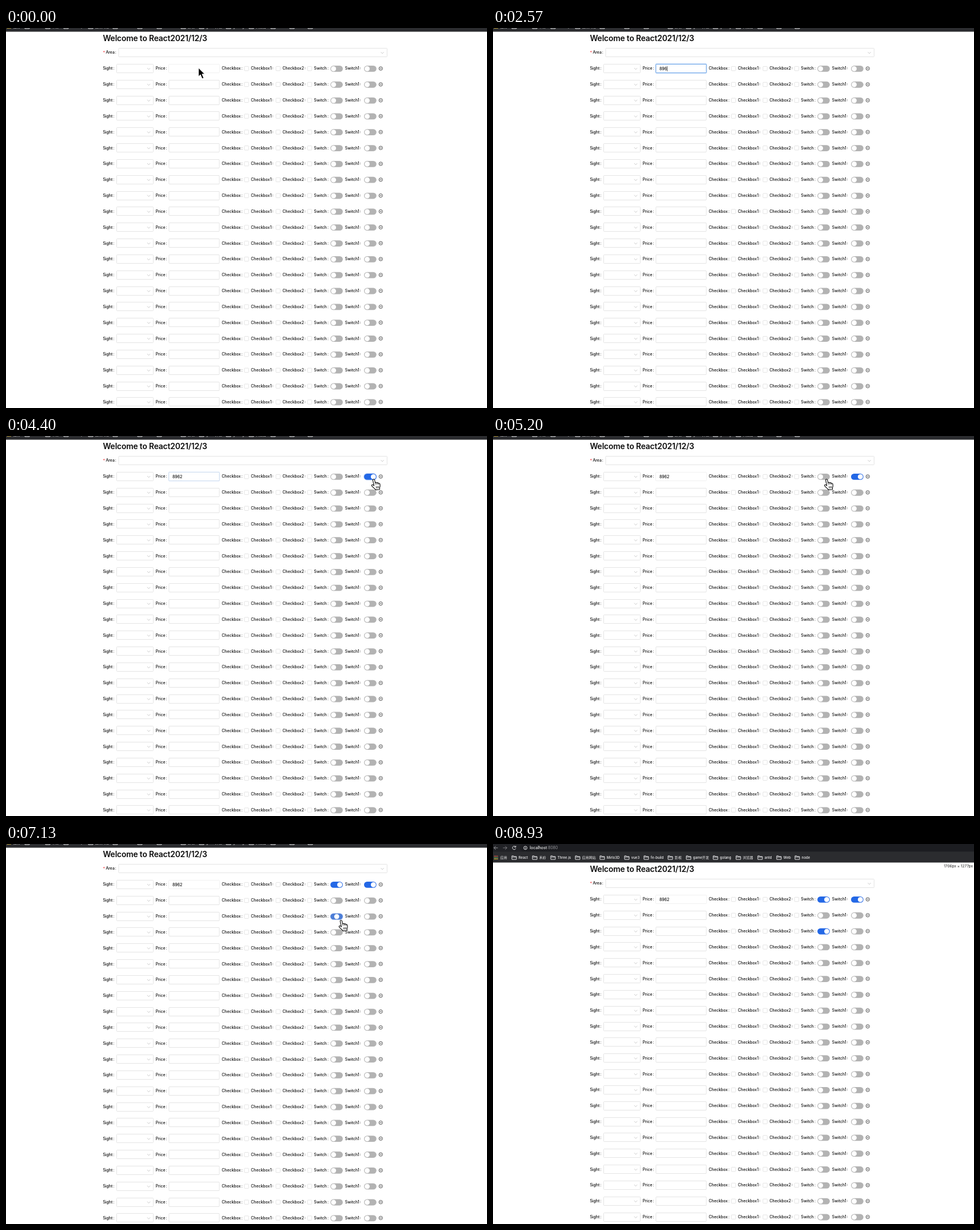
An HTML page for the animation above (9630 ms loop, 841 px wide and 666 px high).

```html
<!DOCTYPE html>
<html lang="en">
<head>
<meta charset="utf-8">
<title>Form list</title>
<style>
  html, body { margin: 0; width: 100%; height: 100%; overflow: hidden; background: #fff; }
  svg { display: block; width: 841px; height: 666px; }
  text { font: 500 6.9px Inter, "Noto Sans CJK SC", "Noto Sans CJK", sans-serif; fill: #0c0c0c; white-space: pre; }
  .title { font-size: 13.8px; font-weight: 600; letter-spacing: -.15px; }
  .mark { font-size: 6px; fill: #f1f1f2; }
  .box { fill: #fff; stroke: #dedede; stroke-width: .8; }
  .line { fill: none; stroke: #b8b8b8; stroke-width: .7; }
  .tool { fill: none; stroke: #e4e4e6; stroke-width: 1; }
  .icon { fill: none; stroke: #2a2a2a; stroke-width: .8; }
</style>
</head>
<body>
<svg id="stage" viewBox="0 0 841 666"></svg>
<script>
const LOOP = 9630, ROWS = 22, TOP = 97, PITCH = 27.83, SCROLL = -26;
const SWITCH_X = [567.2, 626], TEXT_X = 291;
const GRAY = [179, 179, 179], BLUE = [36, 104, 230];

const stage = document.getElementById('stage');
function add(parent, tag, attrs = {}, text) {
  const el = document.createElementNS('http://www.w3.org/2000/svg', tag);
  set(el, attrs);
  if (text !== undefined) el.textContent = text;
  return parent.appendChild(el);
}
function set(el, attrs) {
  for (const key in attrs) el.setAttribute(key, attrs[key]);
}
const rowY = i => TOP + i * PITCH;
const clamp = v => Math.max(0, Math.min(1, v));
const smooth = v => { v = clamp(v); return v * v * (3 - 2 * v); };
const mix = (a, b, p) => `rgb(${a.map((v, i) => Math.round(v + (b[i] - v) * p))})`;
const show = (el, on) => el.setAttribute('visibility', on ? 'visible' : 'hidden');

const page = add(stage, 'g');
const label = (x, y, text) => {
  const el = add(page, 'text', { x, y: y + 2.4 }, text);
  add(el, 'tspan', { dx: 1 }, ':');
};
const box = (x, y, w) => add(page, 'rect', {
  class: 'box', x, y: Math.round(y - 8) + .5, width: w, height: 15, rx: .9
});
const chevron = (x, y) =>
  add(page, 'path', { class: 'line', d: `M${x - 2.6} ${y - 1.2}l2.6 2.9l2.6 -2.9` });

function drawBrowser() {
  add(page, 'rect', { width: 841, height: 32.5, fill: '#2b2c2f' });
  add(page, 'rect', { width: 841, height: 13.5, fill: '#212226' });
  add(page, 'rect', { x: 47, y: -1, width: 810, height: 14, rx: 7, fill: '#1c1d21' });
  add(page, 'path', { class: 'tool', opacity: .6, d: 'M8.5 6.8H1.8M4.8 3.7L1.7 6.8L4.8 9.9' });
  add(page, 'path', { class: 'tool', opacity: .45, d: 'M17.5 6.8H24.2M21.2 3.7L24.3 6.8L21.2 9.9' });
  add(page, 'path', { class: 'tool', d: 'M39.3 4.8A3 3 0 1 0 39.9 7.6M39.9 3.2V5.5H37.4' });
  add(page, 'circle', { class: 'tool', cx: 56.6, cy: 6.8, r: 2.9, 'stroke-width': .7 });
  add(page, 'path', { class: 'tool', d: 'M56.6 6.3V8.5M56.6 4.9V5.6' });
  const url = add(page, 'text', { x: 64.3, y: 9.2, style: 'fill:#f2f2f2' }, 'localhost');
  add(url, 'tspan', { style: 'fill:#96979b;font-weight:400' }, ':8080');

  const dots = ['#e05a4e', '#58a55c', '#e8c33a'];
  for (let i = 0; i < 9; i++) {
    add(page, 'rect', {
      x: 2 + (i % 3) * 2.4, y: 20.6 + Math.floor(i / 3) * 2.4,
      width: 1.6, height: 1.6, fill: dots[Math.floor(i / 3)]
    });
  }
  add(page, 'text', { class: 'mark', x: 12.7, y: 26 }, '应用');
  const marks = [
    [33, 'React'], [69, '禾岭'], [101, 'Three.js'], [144, '应用网站'], [187, 'Mirlo3D'],
    [230, 'vue3'], [264, 'fe-build'], [306, '影视'], [338, 'game开发'], [385, 'golang'],
    [425, '浏览器'], [463, 'antd'], [496, 'Web'], [528, 'node']
  ];
  for (const [x, name] of marks) {
    add(page, 'path', {
      class: 'tool', 'stroke-width': .8,
      d: `M${x} 20.8h3l1 1.2h4v5h-8zM${x} 22.9h8`
    });
    add(page, 'text', { class: 'mark', x: x + 11.8, y: 26 }, name);
  }
}

function makeSwitch(x, y) {
  const ring = add(page, 'rect', {
    x: x - 1.2, y: y - 6.2, width: 24.1, height: 13.2, rx: 6.6, fill: '#2468e6', opacity: 0
  });
  const track = add(page, 'rect', { x, y: y - 5, width: 21.7, height: 10.8, rx: 5.4, fill: mix(GRAY, BLUE, 0) });
  const knob = add(page, 'circle', { cx: x + 5.5, cy: y + .4, r: 4.4, fill: '#fff' });
  return { x, ring, track, knob };
}

drawBrowser();
add(page, 'text', { class: 'title', x: 169.4, y: 48.7 }, 'Welcome to React2021/12/3');
add(page, 'text', { x: 169.4, y: 72, style: 'fill:#f03a3e' }, '*');
label(174.4, 69, 'Area');
box(197, 69, 469.3);
chevron(658, 69.2);

const switches = [];
for (let i = 0; i < ROWS; i++) {
  const y = rowY(i);
  label(169.4, y, 'Sight');
  box(193.5, y, 64);
  chevron(249.6, y + .2);
  label(261.7, y, 'Price');
  box(284.9, y, 88);
  [[377.2, 'Checkbox', 416.8], [428.2, 'Checkbox1', 472], [483.5, 'Checkbox2', 527.2]].forEach(([x, name, cx]) => {
    label(x, y, name);
    add(page, 'rect', { class: 'box', x: cx, y: y - 3.6, width: 7.4, height: 7.4, rx: .8 });
  });
  label(538.6, y, 'Switch');
  label(592.8, y, 'Switch1');
  switches.push(SWITCH_X.map(x => makeSwitch(x, y)));
  add(page, 'circle', { class: 'icon', cx: 655.2, cy: y, r: 3.1 });
  add(page, 'path', { class: 'icon', d: `M653.6 ${y}h3.2` });
}

const halo = add(page, 'rect', {
  x: 284.4, y: 88.9, width: 89, height: 16.2, rx: 1.6, fill: 'none', stroke: '#2f7de6', 'stroke-width': 1.6, opacity: 0
});
const focusBox = box(284.9, TOP, 88);
set(focusBox, { style: 'stroke:#5297e8' });
const price = add(page, 'text', { x: TEXT_X, y: TOP + 2.5 });
const caret = add(page, 'rect', { y: 93, width: .7, height: 9, fill: '#111' });
const sizeNote = add(stage, 'text', {
  x: 839, y: 41.3, 'text-anchor': 'end', style: 'font-size:6.5px;font-weight:400;fill:#222'
}, '1706px × 1277px');

const cursors = {
  arrow: add(stage, 'g'),
  beam: add(stage, 'g'),
  hand: add(stage, 'g')
};
add(cursors.arrow, 'path', {
  d: 'M0 0V15L3.4 11.8L6.3 18.8L9.1 17.6L6.2 10.8H10.8Z',
  fill: '#000', stroke: '#fff', 'stroke-width': .9
});
add(cursors.beam, 'path', {
  d: 'M-2.4 -6.5Q0 -6.5 0 -5Q0 -6.5 2.4 -6.5M0 -5V5M-2.4 6.5Q0 6.5 0 5Q0 6.5 2.4 6.5M-1.2 2H1.2',
  fill: 'none', stroke: '#222', 'stroke-width': .9
});
add(cursors.hand, 'path', {
  d: 'M-1.7 1.6C-1.9 -.4 1 -.7 1.5 1.3L2.6 6.2C3 5.1 5 5.2 5.4 6.6C5.9 5.7 7.8 5.9 8.2 7.4' +
     'C8.8 6.6 10.6 7 10.9 8.8C11.5 11.6 11 13.4 10.2 15.2L10.2 18L3.2 18.6C2.2 16.4 -1.4 14.2 -3.3 11.8' +
     'C-4.4 10.2 -2.8 8.8 -1.4 9.8L.4 11.4Z',
  fill: '#fff', stroke: '#000', 'stroke-width': 1.1, 'stroke-linejoin': 'round'
});
add(cursors.hand, 'path', {
  d: 'M2.6 6.2L3.2 9.2M5.4 6.6L5.9 9.4M8.2 7.4L8.6 9.6M4.3 12.4L4.7 16M6.4 12.2L6.7 15.8M8.5 12L8.6 15.6',
  fill: 'none', stroke: '#000', 'stroke-width': .8
});

// [time, x, y] of the pointer tip
const path = [
  [3300, 340, 76], [3430, 430, 104], [3530, 540, 119], [3630, 618, 100], [3730, 639.5, 75.8],
  [4030, 643, 75.8], [4670, 643, 75.8], [5200, 583.3, 75.8], [5840, 583.3, 75.8],
  [6300, 585, 139.5], [6560, 585, 139.5], [6680, 588, 140], [6870, 586, 133.8]
];
// [time, row, column, on]
const clicks = [
  [4200, 0, 1, 1], [5470, 0, 0, 1], [7030, 2, 0, 1], [7700, 2, 0, 0], [8300, 2, 0, 1]
];
const keys = [[770, ''], [1500, '8'], [2000, '89'], [2570, '896'], [2900, '8962']];
const scroll = [[0, SCROLL], [8870, -19], [8900, -8], [8930, 0]];
const latest = (list, t) => list.filter(item => item[0] <= t).pop();

function pointerAt(t) {
  const i = path.findIndex(p => p[0] > t);
  if (i < 0) return path[path.length - 1].slice(1);
  if (i === 0) return path[0].slice(1);
  const [t0, x0, y0] = path[i - 1], [t1, x1, y1] = path[i];
  const slow = t1 - t0 > 250;
  const p = slow ? smooth((t - t0) / (t1 - t0)) : (t - t0) / (t1 - t0);
  return [x0 + (x1 - x0) * p, y0 + (y1 - y0) * p];
}

function cursorKind(x, y) {
  if (x < 373 && y < 80) return 'beam';
  const row = Math.round((y - SCROLL - TOP) / PITCH);
  const near = Math.abs(y - SCROLL - rowY(row)) < 7.5;
  return near && SWITCH_X.some(s => x >= s && x <= s + 22) ? 'hand' : 'arrow';
}

function drawPointer(t) {
  let kind = null, x, y;
  if (t < 30) [kind, x, y] = ['arrow', 336.6, 70];
  else if (t >= 70 && t < 1570) [kind, x, y] = ['beam', 338, 76];
  else if (t >= 3330 && t < 8600) {
    [x, y] = pointerAt(t);
    kind = cursorKind(x, y);
  }
  for (const name in cursors) show(cursors[name], name === kind);
  if (kind) set(cursors[kind], { transform: `translate(${x} ${y})` });
}

function drawSwitches(t) {
  for (const [row, col] of [[0, 0], [0, 1], [2, 0]]) {
    const last = latest(clicks.filter(c => c[1] === row && c[2] === col), t);
    let on = 0, glow = 0;
    if (last) {
      const age = t - last[0];
      on = last[3] ? smooth(age / 200) : 1 - smooth(age / 200);
      glow = Math.min(clamp(age / 200), clamp((1000 - age) / 600));
    }
    const { x, ring, track, knob } = switches[row][col];
    set(track, { fill: mix(GRAY, BLUE, Math.sqrt(on)) });
    set(knob, { cx: x + 5.5 + 10.8 * on });
    set(ring, { opacity: t < 8870 ? .18 * glow : 0 });
  }
}

function drawPrice(t) {
  const focus = smooth((t - 630) / 300) * (1 - smooth((t - 4200) / 300));
  set(halo, { opacity: .25 * focus });
  set(focusBox, { 'stroke-opacity': focus });
  const key = latest(keys, t);
  const text = key ? key[1] : '';
  if (price.textContent !== text) price.textContent = text;
  const lit = key && t < 4200 && Math.floor((t - key[0]) / 500) % 2 === 0;
  show(caret, lit);
  if (lit) set(caret, { x: TEXT_X + (text ? price.getComputedTextLength() : 0) });
}

function render(now) {
  const t = now % LOOP;
  set(page, { transform: `translate(0 ${latest(scroll, t)[1]})` });
  show(sizeNote, t >= 8870);
  drawPrice(t);
  drawSwitches(t);
  drawPointer(t);
}

const start = performance.now();
function tick() {
  render(performance.now() - start);
  requestAnimationFrame(tick);
}
tick();
</script>
</body>
</html>
```
